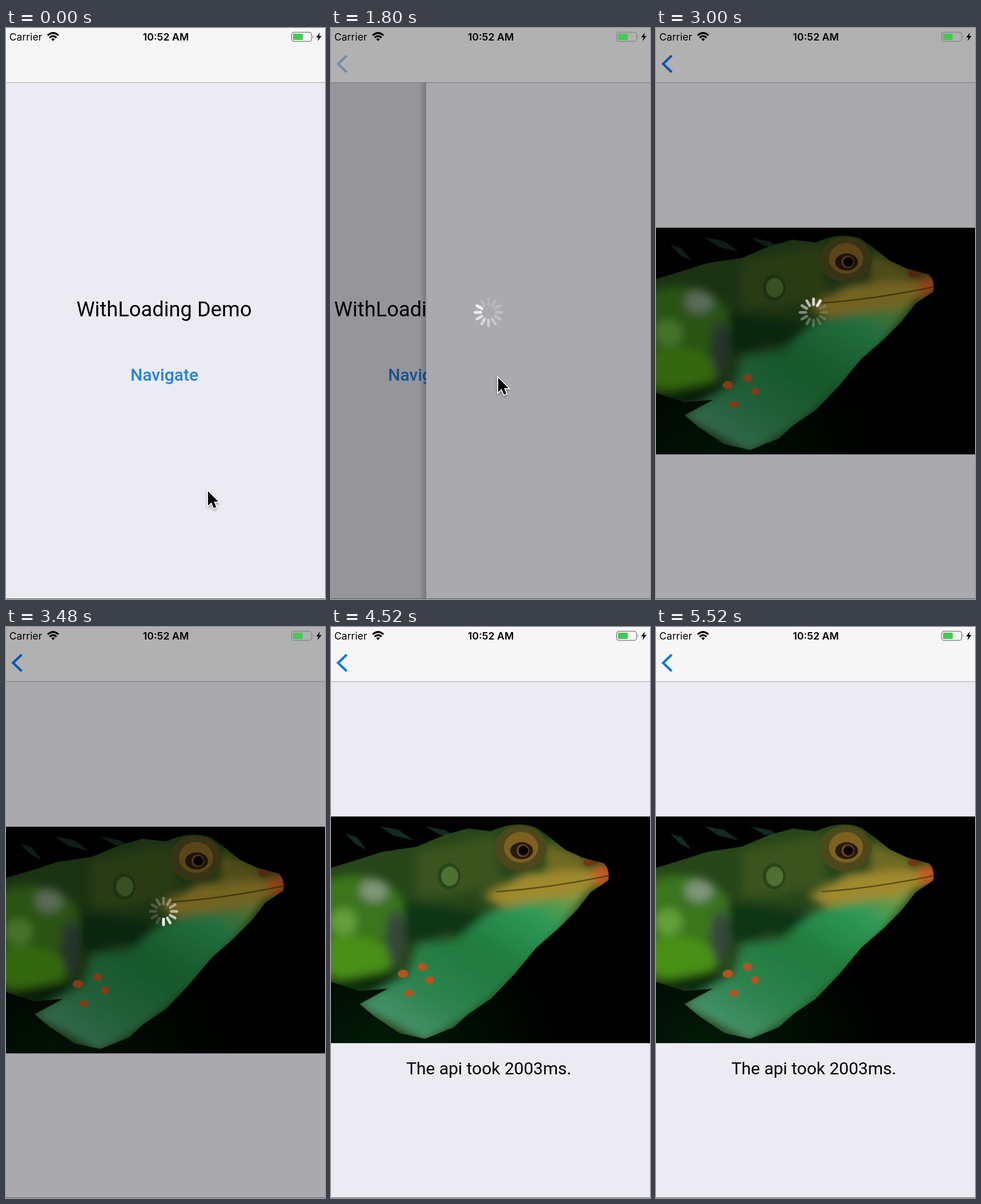
Recreate the animation shown at these times as an HTML page. Size 559 by 1002 pixels, loop 5560 ms.

```html
<!DOCTYPE html>
<html lang="en">
<head>
<meta charset="utf-8">
<title>WithLoading Demo</title>
<style>
  html, body { margin: 0; width: 100%; height: 100%; overflow: hidden; background: #ecebf2; }
  svg { display: block; width: 100vw; height: 100vh; }
  text { font-family: Roboto, sans-serif; text-anchor: middle; }
  .status text { font-family: Inter, sans-serif; }

  .anim { animation: 5.56s linear infinite; }
  .hard { animation-timing-function: step-end; }

  #home { animation-name: home; }
  #shade { animation-name: shade; }
  #card { animation-name: card; }
  #back { animation-name: back; }
  #photo { animation-name: photo; }
  #caption { animation-name: caption; }
  #overlay { animation-name: overlay; }
  #spokes { animation-name: spin; }
  #cursor { animation-name: cursor; filter: drop-shadow(0 2px 2px rgba(0, 0, 0, .35)); }

  /* push transition, half a second long */
  @keyframes home {
    0%, 30.27% { transform: none; animation-timing-function: cubic-bezier(.2833, .99, .31833, .99); }
    39.26%, 100% { transform: translateX(-168px); }
  }
  @keyframes shade {
    0%, 30.27% { opacity: 0; animation-timing-function: cubic-bezier(.2833, .99, .31833, .99); }
    39.26%, 100% { opacity: .17; }
  }
  @keyframes card {
    0%, 30.26% { transform: translateX(580px); }
    30.27% { transform: translateX(559px); animation-timing-function: cubic-bezier(.2833, .99, .31833, .99); }
    39.26%, 100% { transform: none; }
  }
  @keyframes back {
    0%, 31.3% { opacity: 0; animation-timing-function: ease-out; }
    35.5%, 100% { opacity: 1; }
  }

  /* the picture loads, then moves up to make room for the caption */
  @keyframes photo {
    0% { opacity: 0; transform: translateY(350.5px); }
    43.17% { opacity: 1; transform: translateY(350.5px); }
    80.58%, 100% { opacity: 1; transform: translateY(332.5px); }
  }
  @keyframes caption {
    0% { opacity: 0; }
    80.58%, 100% { opacity: 1; }
  }

  @keyframes overlay {
    0%, 29.85% { opacity: 0; }
    29.86%, 79.5% { opacity: 1; }
    81.29%, 100% { opacity: 0; }
  }
  @keyframes spin {
    0%, 29.706% { transform: rotate(270deg); animation-timing-function: steps(36, end); }
    83.663%, 100% { transform: rotate(1350deg); }
  }
  @keyframes cursor {
    0%, 1.4% { transform: translate(354px, 811px); animation-timing-function: cubic-bezier(.4, 0, .5, 1); }
    10.4% { transform: translate(320px, 684px); animation-timing-function: cubic-bezier(.2, .6, .4, 1); }
    19.5%, 35% { transform: translate(293px, 612px); animation-timing-function: cubic-bezier(.5, 0, .7, .8); }
    45.32% { transform: translate(373px, 995px); }
    46%, 100% { transform: translate(375px, 1010px); }
  }
</style>
</head>
<body>
<svg viewBox="0 0 559 1002" preserveAspectRatio="none">
  <defs>
    <linearGradient id="edge"><stop offset="0" stop-opacity="0"/><stop offset="1" stop-opacity=".2"/></linearGradient>
    <linearGradient id="throat" x1="1" y1="0" x2="0" y2="1">
      <stop offset="0" stop-color="#9a9a3c"/>
      <stop offset=".2" stop-color="#2f9a58"/>
      <stop offset=".45" stop-color="#1f7a3c"/>
      <stop offset=".7" stop-color="#2f8450"/>
      <stop offset="1" stop-color="#5a9c80"/>
    </linearGradient>
    <radialGradient id="glow" cx=".15" cy="1" r=".6"><stop offset="0" stop-color="#031a07"/><stop offset="1" stop-color="#000"/></radialGradient>
    <filter id="soft" x="-20%" y="-20%" width="140%" height="140%"><feGaussianBlur stdDeviation="8"/></filter>
    <clipPath id="frame"><rect width="559" height="398"/></clipPath>
    <clipPath id="body">
      <path d="M0 90 40 78 90 62 150 53 200 32 240 21 280 26Q325 5 360 20L385 38 410 58 440 72 478 82Q489 92 486 112L455 133 430 165 400 195 360 230 320 278 280 320 240 347 215 370 165 390 120 380 75 350 50 329 100 302 50 306 0 290Z"/>
    </clipPath>
  </defs>

  <g id="home" class="anim">
    <rect y="96" width="727" height="906" fill="#ecebf2"/>
    <text x="277" y="506" font-size="36.3">WithLoading Demo</text>
    <text x="277.5" y="619" font-size="30" font-weight="500" fill="#2282e3">Navigate</text>
  </g>
  <rect id="shade" class="anim" y="96" width="559" height="906"/>

  <g id="card" class="anim">
    <rect x="-12" y="96" width="12" height="906" fill="url(#edge)"/>
    <rect y="96" width="559" height="906" fill="#ecebf2"/>
    <g id="photo" class="anim hard">
      <g clip-path="url(#frame)">
        <rect width="559" height="398" fill="url(#glow)"/>
        <path d="M85 17 118 23 145 42 110 34ZM25 30 45 36 62 58 42 48ZM165 17 200 24 225 38 190 32Z" fill="#122a24"/>
        <g clip-path="url(#body)">
          <rect width="559" height="398" fill="#26461a"/>
          <g filter="url(#soft)">
            <ellipse cx="40" cy="165" rx="90" ry="62" fill="#3a741e"/>
            <ellipse cx="75" cy="130" rx="24" ry="20" fill="#7f9478"/>
            <ellipse cx="22" cy="185" rx="24" ry="24" fill="#62a03a"/>
            <ellipse cx="38" cy="248" rx="72" ry="38" fill="#4a9016"/>
            <ellipse cx="112" cy="212" rx="15" ry="48" fill="#34463c"/>
            <path d="M0 290 100 270 130 290 90 310 0 310Z" fill="#0e2a0a"/>
            <path d="M125 150 200 160 290 175 290 215 200 205 135 225Z" fill="#0f3418"/>
            <path d="M280 165 455 125 400 200 320 285 240 350 165 395 45 330 135 275 150 225 220 215Z" fill="url(#throat)"/>
            <path d="M150 60 290 30 300 120 210 140 150 140Z" fill="#3a521e"/>
            <path d="M265 140 340 100 440 92 486 90 475 120 420 140 300 158Z" fill="#a08a2e"/>
            <path d="M375 45 450 72 440 95 375 95Z" fill="#6e6a24"/>
            <ellipse cx="476" cy="102" rx="18" ry="20" fill="#c85a22"/>
          </g>
          <g fill="#b8521e">
            <ellipse cx="126" cy="276" rx="9" ry="7"/>
            <ellipse cx="160" cy="264" rx="8" ry="7"/>
            <ellipse cx="173" cy="287" rx="7" ry="7"/>
            <ellipse cx="136" cy="310" rx="8" ry="6"/>
          </g>
          <ellipse cx="332" cy="56" rx="46" ry="40" fill="#4c481c"/>
          <ellipse cx="333" cy="54" rx="30" ry="27" fill="#7e6020"/>
          <ellipse cx="334" cy="60" rx="20" ry="15" fill="#241c0e"/>
          <circle cx="336" cy="60" r="11" fill="#7a4420"/>
          <circle cx="337" cy="60" r="8.500"/>
          <ellipse cx="207" cy="105" rx="20" ry="23" fill="#2a441a"/>
          <ellipse cx="208" cy="105" rx="15" ry="17" fill="#4e7030"/>
          <ellipse cx="451" cy="81" rx="9" ry="6" fill="#7a3214"/>
          <path d="M290 132Q380 126 486 104" fill="none" stroke="#4c4010" stroke-width="2"/>
        </g>
      </g>
    </g>
    <text id="caption" class="anim hard" x="276.5" y="785" font-size="30">The api took 2003ms.</text>
  </g>

  <rect width="559" height="95" fill="#f6f6f6"/>
  <rect y="95" width="559" height="1.2" fill="#b6b6ba"/>
  <path id="back" class="anim" d="M27.500 48.500 12.500 63 27.500 77.500" fill="none" stroke="#1278f0" stroke-width="4.300"/>

  <g id="overlay" class="anim">
    <rect width="559" height="1002" fill-opacity=".28"/>
    <g transform="translate(276 499)"><g id="spokes" class="anim" stroke="#fff" stroke-width="4.800" stroke-linecap="round"></g></g>
  </g>

  <g class="status">
    <text x="34.5" y="22" font-size="17.6">Carrier</text>
    <text x="280" y="22" font-size="17.8" font-weight="600">10:52 AM</text>
    <g fill="none" stroke="#000" stroke-width="3.2">
      <path d="M73 13Q82.500 4.500 92 13M76.500 17Q82.500 11.500 88.500 17"/>
      <path d="M79.300 19.500Q82.500 16.500 85.700 19.500L82.500 23Z" fill="#000" stroke="none"/>
    </g>
    <rect x="500.500" y="7.500" width="35" height="16" rx="4" fill="none" stroke="#8a8a8c" stroke-width="1.500"/>
    <rect x="503" y="10" width="17" height="11" rx="1" fill="#43c956"/>
    <path d="M537.500 12.500Q540 15.500 537.500 18.500Z" fill="#8a8a8c"/>
    <path d="M550 8 543.500 16.500H547.500L546 23 553 14H548.800Z"/>
  </g>
  <rect y="1001" width="559" height="1" fill="#5c5c60"/>

  <g id="cursor" class="anim">
    <path d="M0 2V27L6 21.500 10.200 31.500 14.300 29.700 10.300 20H18Z" stroke="#fff" stroke-width="3.400" paint-order="stroke"/>
  </g>
</svg>
<script>
  // twelve spokes, fading counter-clockwise behind the leading one
  const spokes = document.getElementById('spokes');
  for (let i = 0; i < 12; i++) {
    const line = document.createElementNS(spokes.namespaceURI, 'line');
    line.setAttribute('y1', -13.5);
    line.setAttribute('y2', -23.5);
    line.setAttribute('transform', `rotate(${-30 * i})`);
    line.setAttribute('opacity', 0.16 + 0.84 * (1 - i / 11) ** 2.4);
    spokes.append(line);
  }
</script>
</body>
</html>
```
